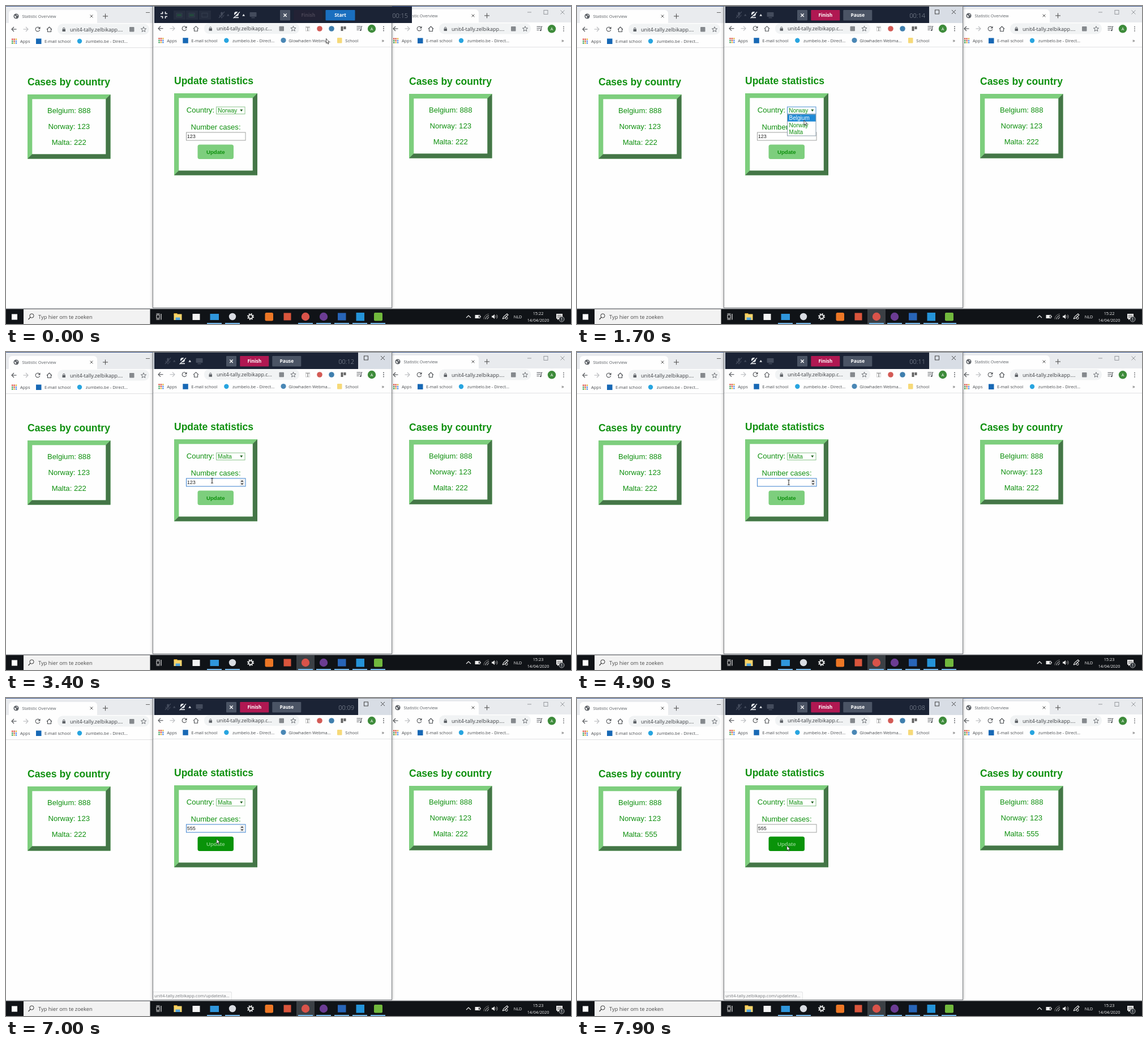
Write an HTML page with a canvas that moves like this. It is 998x561 px and loops after 8 s.

```html
<!DOCTYPE html>
<html lang="nl">
<head>
<meta charset="utf-8">
<title>Case statistics</title>
<style>
html, body { margin: 0; width: 100%; height: 100%; overflow: hidden; background: #fefefe; }
canvas { display: block; }
</style>
</head>
<body>
<canvas id="stage" width="998" height="561"></canvas>
<script>
const c = document.getElementById('stage').getContext('2d');
const LOOP = 8000;
const UI = '"Open Sans", sans-serif', PAGE = '"Liberation Sans", Arial, sans-serif';
const GREEN = '#0f900f', LIGHT = '#7dce7d', DARK = '#447647', GREY = '#5f6368';
const HOST = 'unit4-tally.zelbikapp.';

const clamp = v => Math.max(0, Math.min(1, v));
const smooth = v => v * v * (3 - 2 * v);
const latest = (steps, t) => steps.reduce((value, [at, next]) => t >= at ? next : value, steps[0][1]);

function rect(x, y, w, h, fill, r = 0) {
  c.fillStyle = fill;
  c.beginPath();
  c.roundRect(x, y, w, h, r);
  c.fill();
}
function frame(x, y, w, h, color, width = 1) {
  c.strokeStyle = color;
  c.lineWidth = width;
  c.strokeRect(x, y, w, h);
}
function disc(x, y, r, fill) {
  c.fillStyle = fill;
  c.beginPath();
  c.arc(x, y, r, 0, 7);
  c.fill();
}
function ring(x, y, r, color, width = 1, from = 0, to = 2 * Math.PI) {
  c.strokeStyle = color;
  c.lineWidth = width;
  c.beginPath();
  c.arc(x, y, r, from, to);
  c.stroke();
}
function line(color, width, ...p) {
  c.strokeStyle = color;
  c.lineWidth = width;
  c.beginPath();
  for (let i = 0; i < p.length; i += 2) c.lineTo(p[i], p[i + 1]);
  c.stroke();
}
function poly(fill, ...p) {
  c.fillStyle = fill;
  c.beginPath();
  for (let i = 0; i < p.length; i += 2) c.lineTo(p[i], p[i + 1]);
  c.closePath();
  c.fill();
}
function text(s, x, y, size, color, family = UI, weight = 400, align = 'left') {
  c.font = `${weight} ${size}px ${family}`;
  c.fillStyle = color;
  c.textAlign = align;
  c.fillText(s, x, y);
}
function cross(x, y, r, color, width = 1) {
  line(color, width, x - r, y - r, x + r, y + r);
  line(color, width, x + r, y - r, x - r, y + r);
}
function at(x, y, draw) {
  c.save();
  c.translate(x, y);
  draw();
  c.restore();
}

// Browser furniture
function arrow(x, y, dir, color) {
  line(color, 1.1, x - 4.5 * dir, y, x + 4 * dir, y);
  line(color, 1.1, x, y - 4, x + 4 * dir, y, x, y + 4);
}
function star(x, y) {
  c.beginPath();
  for (let i = 0; i < 10; i++) {
    const a = i * Math.PI / 5 - Math.PI / 2, r = i % 2 ? 2.1 : 4.8;
    c.lineTo(x + r * Math.cos(a), y + r * Math.sin(a));
  }
  c.closePath();
  c.strokeStyle = GREY;
  c.lineWidth = 0.9;
  c.stroke();
}
function globe(x, y) {
  disc(x, y, 4.6, GREY);
  poly('#fff', x - 3.5, y - 1, x - 1, y - 0.5, x, y + 1.5, x - 1.5, y + 3.5);
  poly('#fff', x + 0.5, y - 3.5, x + 3, y - 1.5, x + 1, y - 0.5);
}
function tab(x, y) {
  rect(x + 5, y + 7, 156, 26, '#fefefe', [6, 6, 0, 0]);
  globe(x + 18, y + 18);
  text('Statistic Overview', x + 28.5, y + 21, 7.3, '#5b5f64');
  cross(x + 151, y + 18, 2.4, '#555');
  line('#555', 1.1, x + 171, y + 18, x + 180, y + 18);
  line('#555', 1.1, x + 175.5, y + 13.5, x + 175.5, y + 22.5);
}
function navigation(x, y, host, pillEnd, iconShift = 0) {
  rect(x + 91, y + 31.5, pillEnd - 91, 19, '#f1f3f4', 9);
  arrow(x + 14, y + 41, -1, '#4c4f53');
  arrow(x + 35, y + 41, 1, '#b9bbbe');
  ring(x + 56, y + 41, 3.8, '#4c4f53', 1.1, 0.3, 5.5);
  poly('#4c4f53', x + 60.5, y + 36.5, x + 60.5, y + 40.5, x + 56.5, y + 40.5);
  line('#4c4f53', 1.1, x + 72, y + 41.5, x + 76.5, y + 37, x + 81, y + 41.5);
  line('#4c4f53', 1.1, x + 73.5, y + 41, x + 73.5, y + 45.5, x + 79.5, y + 45.5, x + 79.5, y + 41);
  rect(x + 99.5, y + 40.5, 5.5, 4.5, GREY, 0.5);
  ring(x + 102.2, y + 40, 1.7, GREY, 1, Math.PI, 0);
  text(host, x + 113, y + 44.5, 9, '#3b3e42');
  rect(x + 218 + iconShift, y + 37, 8.5, 8.5, '#85898d', 1);
  star(x + 243 + iconShift, y + 41.5);
}
function bookmarks(x, y) {
  ['#db5145', '#db5145', '#e2b53b', '#48a461', '#db5145', '#5590e8', '#48a461', '#e2b53b', '#5590e8']
    .forEach((color, i) => rect(x + 10 + i % 3 * 3.4, y + 57.5 + (i / 3 | 0) * 3.4, 2.4, 2.4, color));
  text('Apps', x + 25, y + 65, 7.5, '#4a4d51');
  rect(x + 53, y + 57.5, 9.5, 9.5, '#1768b5');
  text('E-mail school', x + 68, y + 65, 7.5, '#4a4d51');
  disc(x + 130, y + 62, 4.2, '#28a5e0');
  text('zumbelo.be - Direct...', x + 140.8, y + 65, 7.5, '#4a4d51');
}
function profile(x, y) {
  for (const dy of [-4, -1]) line(GREY, 1.1, x - 5, y + dy, x + 2, y + dy);
  line(GREY, 1.1, x - 5, y + 2, x - 1, y + 2);
  line(GREY, 1.1, x + 5, y - 4, x + 3, y - 4, x + 3, y + 2);
  disc(x + 1.8, y + 2.5, 1.5, GREY);
  disc(x + 21.5, y, 7.2, '#3d8b3a');
  text('A', x + 21.5, y + 2.6, 7.2, '#fff', UI, 400, 'center');
  for (const dy of [-3.5, 0, 3.5]) disc(x + 42.5, y + dy, 0.9, '#4c4f53');
}
function controls(x, y, color) {
  frame(x - 3.5, y - 3.5, 7, 7, color, 0.9);
  cross(x + 29.5, y, 3.5, color, 0.9);
}

// Page parts
function bevel(x, y, w, h) {
  const b = 8.3, r = x + w, d = y + h;
  rect(x, y, w, h, LIGHT);
  poly(DARK, r, y, r, d, x, d, x + b, d - b, r - b, d - b, r - b, y + b);
  rect(x + b, y + b, w - 2 * b, h - 2 * b, '#fefefe');
}
function casesPage(malta) {
  text('Cases by country', 38, 139.7, 17.5, GREEN, PAGE, 700);
  bevel(38, 156, 146.5, 113.5);
  ['Belgium: 888', 'Norway: 123', 'Malta: ' + malta].forEach((row, i) =>
    text(row, 111.2, 189.2 + 28 * i, 13.1, GREEN, PAGE, 400, 'center'));
}

function sideWindow(x, y, w, malta) {
  at(x, y, () => {
    rect(x ? 8 : 0, 0, w, 30, '#e9ebee');
    tab(0, 0);
    rect(x ? 8 : 0, 30, w, 506, '#fefefe');
    navigation(0, 0, HOST.slice(0, -1) + '....', 253);
    bookmarks(0, 0);
    rect(x ? 8 : 0, 73, w, 1, '#e0e1e3');
    casesPage(malta);
  });
}

function form(s) {
  text('Update statistics', 297, 138, 17.5, GREEN, PAGE, 700);
  bevel(297, 154, 147, 144.5);
  text('Country:', 318.7, 188, 13.1, GREEN, PAGE);
  text('Number cases:', 370.5, 217.8, 13.1, GREEN, PAGE, 400, 'center');

  rect(318.5, 223, 104.5, 14.5, '#fff');
  frame(318.5, 223, 104.5, 14, s.focus ? '#3d82cf' : '#a0a2a0');
  text(s.value, 319.8, 233.3, 9, '#222', PAGE);
  if (s.caret) rect(319.8 + s.value.length * 5, 225.5, 0.9, 9.5, '#111');
  if (s.focus) {
    rect(413, 224.5, 8, 11.5, '#ececec');
    poly('#444', 414.5, 229, 417, 226, 419.5, 229);
    poly('#444', 414.5, 231.5, 417, 234.5, 419.5, 231.5);
  }

  rect(338.5, 244.5, 63.5, 25.5, s.hover ? '#099309' : LIGHT, 3.5);
  text('Update', 370.3, 260.5, 9.7, s.hover ? LIGHT : GREEN, PAGE, 700, 'center');

  rect(371.5, 178, 50.5, 12.5, '#fff');
  frame(371.5, 178, 50.5, 12.5, s.open ? '#4a90d0' : '#8cc48c');
  text(s.country, 374.3, 187.8, 10, GREEN, PAGE);
  poly('#1d5f1d', 413.3, 182.5, 418.3, 182.5, 415.8, 186.3);
  if (s.open) {
    rect(371.5, 191, 50.5, 38, '#fff');
    ['Belgium', 'Norway', 'Malta'].forEach((name, i) => {
      const picked = i === s.picked;
      if (picked) rect(372, 191.3 + 12.5 * i, 50, 12.5, '#1f8ad6');
      text(name, 374.6, 201 + 12.5 * i, 10, picked ? '#fff' : GREEN, PAGE);
    });
    frame(371.5, 191, 50.5, 38, '#8a9ba8');
  }
}

function mainWindow(s) {
  c.save();
  c.shadowColor = 'rgba(0,0,0,.35)';
  c.shadowBlur = 5;
  rect(259, 0, 422.5, 532.5, '#fefefe');
  c.restore();
  rect(260, 0, 421, 30, s.active ? '#d8dde5' : '#e9ebee');
  controls(636, 10.5, s.active ? '#333' : '#8d9094');
  navigation(259, -1.3, HOST + 'c...', 259, 5.5);
  text('T', 533, 43.5, 10, '#555', '"Liberation Serif", serif', 400, 'center');
  frame(529.5, 36, 7, 8, '#b5b5b5', 0.6);
  disc(554, 40, 4.8, '#d35a55');
  disc(575, 40, 4.8, '#3f7fae');
  rect(591.5, 36, 4, 8, '#666');
  rect(596.5, 36, 4, 5, '#666');
  profile(624.5, 40);
  bookmarks(259.3, -1.3);
  disc(490, 60.5, 4.6, '#4a87b5');
  text('Glowhaden Webma...', 499.3, 63.7, 7.5, '#4a4d51');
  rect(585, 56, 8.5, 9.5, '#f6d978', 1);
  text('School', 599.3, 63.7, 7.5, '#4a4d51');
  text('»', 663.5, 63.5, 9, '#444');
  rect(260, 71.8, 421, 1, '#e0e1e3');
  form(s);
  if (s.hover) {
    rect(259.5, 518, 139.5, 14, '#dcdee0', [0, 3, 0, 0]);
    rect(260, 518.7, 138.3, 13.5, '#fafafa', [0, 3, 0, 0]);
    text(HOST + 'com/updatesta...', 262, 528, 7.6, '#75787c');
  }
  frame(259.5, 0.5, 422, 532, '#7b7e82');
}

// Recorder bar: slides shut towards its left edge
function recorder(s) {
  const dx = 95 * (1 - s.collapse), dim = '#434b5c';
  c.save();
  c.beginPath();
  c.rect(262, 1, 360 + dx, 29);
  c.clip();
  rect(262, 1, 456, 29, '#1b2335');
  if (s.collapse < 1) {
    c.globalAlpha = 1 - s.collapse;
    for (const [sx, sy] of [[-1, -1], [1, -1], [-1, 1], [1, 1]])
      line('#f0f2f5', 1.6, 279 + 6 * sx, 16 + 2.5 * sy, 279 + 2.5 * sx, 16 + 2.5 * sy, 279 + 2.5 * sx, 16 + 6 * sy);
    for (const x of [296, 318, 341]) {
      rect(x, 8, 21, 16, '#252d3e');
      frame(x + 5, 12.5, 10, 7, '#353e4e');
    }
    rect(302, 14, 8, 4, '#24493e');
    rect(324, 14, 8, 4, '#24493e');
    c.globalAlpha = 1;
  }
  c.translate(dx, 0);
  rect(284.3, 10.5, 3.5, 7, dim, 2);
  ring(286, 15.5, 4, dim, 1, 0, Math.PI);
  line(dim, 1, 286, 19.5, 286, 22);
  line(dim, 1.2, 281, 21, 291, 10);
  poly(dim, 295, 17.5, 299.5, 17.5, 297.3, 14);
  disc(312, 14, 4, '#e8ebef');
  rect(308, 19.5, 8, 1.7, '#e8ebef');
  line('#1b2335', 2.5, 306, 20, 318, 9);
  line('#e8ebef', 1.1, 306.5, 21.5, 318, 10.5);
  poly('#e8ebef', 322.3, 17.8, 327, 17.8, 324.7, 14);
  rect(335.5, 11, 12, 8, dim, 1);
  rect(338.5, 20, 6, 1.4, dim);

  const button = (x, w, label, bg, fg = '#fff') => {
    rect(x, 7, w, 18.5, bg, 1);
    text(label, x + w / 2, 19.2, 8.3, fg, UI, 700, 'center');
  };
  rect(389, 7, 18, 18.5, '#4b5465', 1);
  cross(398, 16.3, 2.7, '#fff', 1.4);
  if (s.recording) {
    button(413.3, 51, 'Finish', '#b01852');
    button(470.3, 51, 'Pause', '#4b5465');
  } else {
    button(413.3, 51, 'Finish', '#232235', '#4a4556');
    button(469.5, 52, 'Start', '#1a6fbf');
  }
  text('00:' + String(s.seconds).padStart(2, '0'), 587.3, 21, 11, '#9299a5', UI, 300);
  c.restore();
}

function taskbar(s) {
  rect(0, 533, 998, 2, '#c9cbce');
  rect(0, 534.5, 998, 27, '#101317');
  rect(10, 543.5, 10, 10, '#fff');
  rect(31, 535, 223.5, 26, '#f2f2f2');
  ring(45.5, 546.5, 3.6, '#333');
  line('#333', 1.2, 43, 549.2, 39.5, 553);
  text('Typ hier om te zoeken', 57, 551.7, 9.3, '#4a4a4a');
  frame(266, 545, 5, 6, '#e6e6e6');
  line('#e6e6e6', 1, 265.5, 543, 271.5, 543);
  line('#e6e6e6', 1, 265.5, 553, 271.5, 553);
  line('#e6e6e6', 1.2, 274, 543, 274, 553.5);
  if (s.active) rect(513, 535, 32, 26, '#3b4045');

  rect(296.5, 542, 6, 3, '#e0a92e');
  rect(296.5, 543.5, 14, 10.5, '#f7d56b');
  rect(299.5, 549.5, 8, 4.5, '#55a5dc');
  rect(329.5, 543, 13, 11, '#f3f3f3');
  rect(360.5, 543, 15.5, 11, '#2f96dc');
  disc(400, 548, 6.2, '#d9dce2');
  c.setLineDash([2, 1.93]);
  ring(432, 548, 5, '#eee', 2);
  c.setLineDash([]);
  ring(432, 548, 3.4, '#eee', 1.8);
  rect(457.5, 541, 14.5, 14.5, '#ed7725', 2.5);
  rect(490.5, 541.5, 13, 13, '#d9553c');
  disc(529, 548, 7.2, '#d9534a');
  disc(561, 548, 7.2, '#6b3c93');
  rect(586, 541.5, 14.5, 13, '#2865b8');
  rect(618.5, 541, 14.5, 14.5, '#2493d8');
  rect(650, 541, 15, 14.5, '#71b83d', 2);
  for (const x of [368, 400, 529, 561, 593, 625, 657])
    rect(x - 13, 559, 26, 2, '#74b6e8');

  line('#eee', 1.1, 813, 550, 817, 546, 821, 550);
  frame(829, 545.5, 8, 5, '#eee');
  rect(829, 545.5, 6, 5, '#eee');
  rect(837.5, 547, 1.3, 2, '#eee');
  for (const r of [3, 6, 9]) ring(853, 552.5, r, r > 6 ? '#777' : '#ddd', 1, Math.PI, 1.5 * Math.PI);
  poly('#eee', 858, 546.5, 860, 546.5, 863, 544, 863, 552, 860, 549.5, 858, 549.5);
  ring(863, 548, 2.5, '#ccc', 0.8, -0.9, 0.9);
  ring(863, 548, 5, '#ccc', 0.8, -0.8, 0.8);
  line('#eee', 1.1, 877, 552, 879, 548, 885, 543, 887, 545, 881, 550.5, 877, 552);
  ring(884, 550.5, 2, '#eee');
  text('NLD', 896.8, 551, 7.3, '#f2f2f2');
  text(s.clock, 940, 544.5, 7.3, '#f2f2f2', UI, 400, 'center');
  text('14/04/2020', 940, 557, 7.3, '#f2f2f2', UI, 400, 'center');
  rect(972, 543, 11, 8.5, '#f2f2f2');
  poly('#f2f2f2', 974, 551, 978, 551, 974, 554);
  for (const y of [545, 547, 549]) rect(973.5, y, 8, 0.8, '#555');
  disc(981.5, 552.5, 4.6, '#30353a');
  ring(981.5, 552.5, 4.6, '#ddd', 0.7);
  text('1', 981.5, 555, 6.5, '#fff', UI, 400, 'center');
}

// Pointer: [time, x, y]
const PATH = [
  [0, 565.5, 57.5], [100, 565.5, 57.5], [700, 436.8, 171.5], [900, 405, 184], [1100, 405, 184],
  [1450, 402, 195], [1700, 401, 201.5], [2000, 399, 210], [2300, 392, 221], [2900, 390, 221],
  [3400, 364, 227], [3520, 374, 230], [6600, 374, 230], [7300, 370.7, 260.5], [8000, 370.7, 260.5]
];
const CLICKS = [1150, 2450, 3150, 7480];

function pointerAt(t) {
  const i = PATH.findIndex(p => p[0] > t);
  const [t0, x0, y0] = PATH[i - 1], [t1, x1, y1] = PATH[i];
  const k = smooth((t - t0) / (t1 - t0));
  return [x0 + (x1 - x0) * k, y0 + (y1 - y0) * k];
}
function pointer(t, x, y) {
  if (CLICKS.some(start => t >= start && t < start + 250)) disc(x, y, 8.5, 'rgba(205,196,38,.78)');
  if (t > 2900 && y > 222 && y < 238) {
    line('#222', 1, x, y - 4, x, y + 4);
    line('#222', 0.9, x - 2, y - 4.2, x + 2, y - 4.2);
    line('#222', 0.9, x - 2, y + 4.2, x + 2, y + 4.2);
    return;
  }
  const shape = [0, 0, 0, 8.4, 1.9, 6.7, 3.2, 9.6, 4.6, 9, 3.3, 6.2, 5.8, 6.2];
  at(x, y, () => {
    poly('#fff', ...shape);
    line('#222', 0.8, ...shape, 0, 0);
  });
}

function render(t) {
  const [x, y] = pointerAt(t);
  const s = {
    active: t >= 1100,
    collapse: smooth(clamp((t - 100) / 300)),
    recording: t >= 100,
    seconds: 15 - [1200, 2200, 3200, 4200, 5100, 6200, 7200].filter(tick => t >= tick).length,
    clock: t < 2300 ? '15:22' : '15:23',
    open: t >= 1200 && t < 2500,
    picked: latest([[0, 1], [1450, 0], [1800, 1], [2150, 2]], t),
    country: t < 2500 ? 'Norway' : 'Malta',
    focus: t >= 3200 && t < 7500,
    value: latest([[0, '123'], [4100, '12'], [4300, '1'], [4500, ''], [5700, '5'], [5850, '55'], [6000, '555']], t),
    caret: (t >= 3900 && t < 4900) || (t >= 5500 && t < 6500),
    hover: t > 6600 && y > 244.5
  };
  const malta = t < 7800 ? 222 : 555;

  rect(0, 0, 998, 561, '#fefefe');
  sideWindow(0, 0, 259, malta);
  line('#666', 1, 247, 11.5, 254, 11.5);
  sideWindow(674, -1, 320, malta);
  line('#8d9094', 0.9, 921, 11, 928, 11);
  controls(953.5, 11, '#8d9094');
  profile(942.5, 40.3);
  text('»', 981, 64, 9, '#444');
  rect(0, 0, 998, 1, '#3d578c');
  mainWindow(s);
  recorder(s);
  taskbar(s);
  pointer(t, x, y);
}

const start = performance.now();
function tick() {
  render((performance.now() - start) % LOOP);
  requestAnimationFrame(tick);
}
tick();
</script>
</body>
</html>
```
